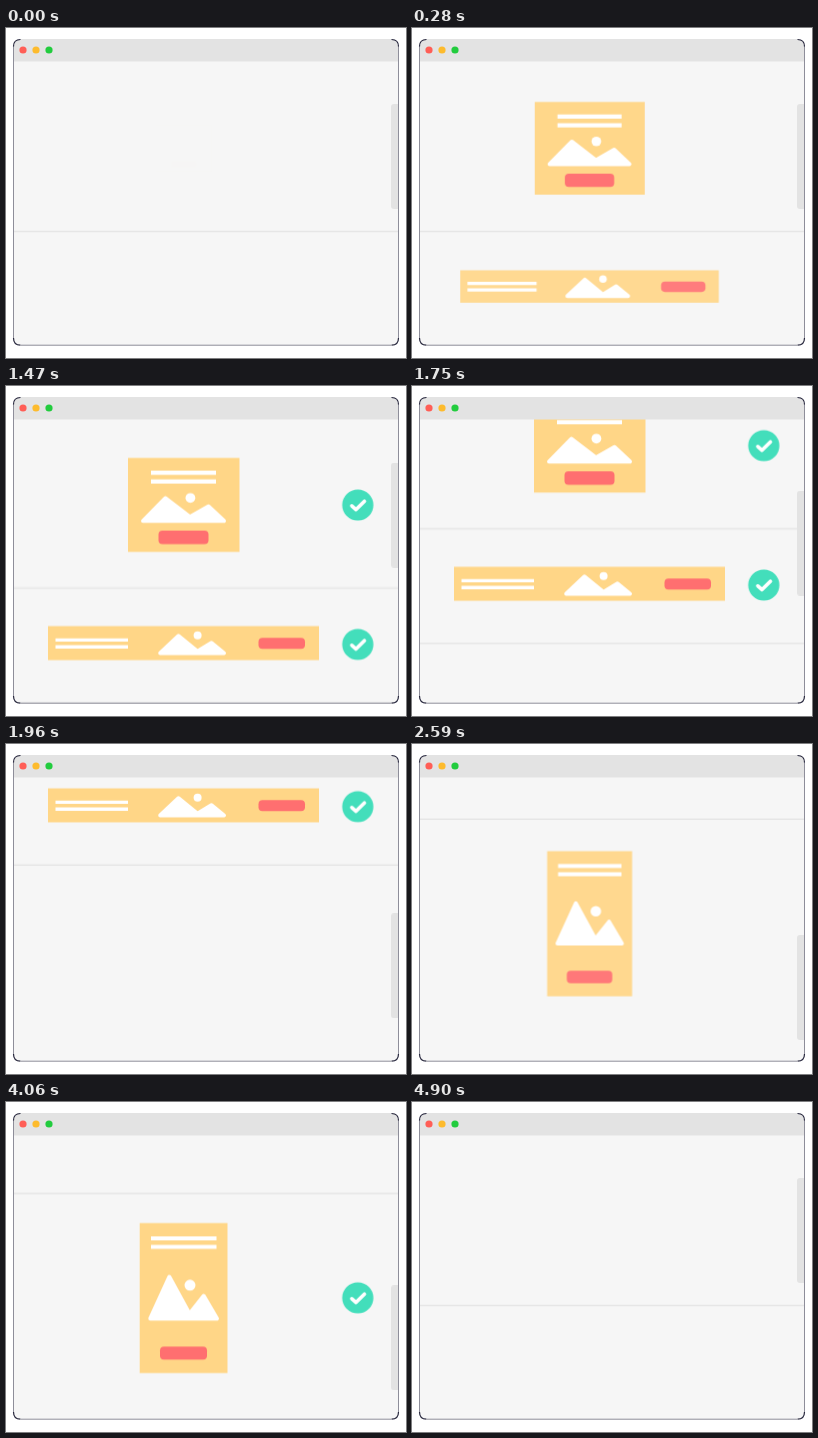
An HTML page that plays this animation: 400 by 330 pixels, repeating every 4.97 s.

```html
<!DOCTYPE html>
<html lang="en">
<head>
<meta charset="utf-8">
<title>Ad preview window</title>
<style>
  html, body { margin: 0; width: 100%; height: 100%; overflow: hidden; background: #fff; }
  svg { display: block; width: 400px; height: 330px; }

  .ad { fill: #ffd687; }
  .line { fill: #fff; }
  .hill { fill: #fff; stroke: #fff; stroke-width: 4; stroke-linejoin: round; }
  .button { fill: #ff6f70; }
  .rule { stroke: #e6e6e6; stroke-width: 1.4; }
  .disc { fill: #43debb; }
  .tick { fill: none; stroke: #fff; stroke-width: 3.6; stroke-linecap: round; stroke-linejoin: round; }
  .edge { fill: none; stroke: #8e8e9a; stroke-width: 1; }
  .corner { fill: none; stroke: #26263c; stroke-width: 1.2; }

  .scroll, .pop, .check { animation: 4970ms linear infinite backwards; }
  .scroll { animation-name: scroll; }
  .pop, .check { transform-box: fill-box; transform-origin: center; animation-delay: var(--at, 0ms); }
  .pop { animation-name: pop; }
  .check { animation-name: check; }

  /* down 1400-2280 ms, back up 3870-4650 ms */
  @keyframes scroll {
    0%, 28.169% { transform: translateY(0); animation-timing-function: cubic-bezier(.65, 0, .35, 1); }
    45.875%, 77.867% { transform: translateY(var(--by)); animation-timing-function: cubic-bezier(.65, 0, .35, 1); }
    93.561%, 100% { transform: translateY(0); }
  }
  @keyframes pop {
    0% { transform: scale(.5); opacity: 0; animation-timing-function: cubic-bezier(.33, 1, .68, 1); }
    8.05%, 60% { transform: scale(1); opacity: 1; }
    60.01%, 100% { transform: scale(.5); opacity: 0; }
  }
  @keyframes check {
    0% { transform: scale(0); animation-timing-function: cubic-bezier(.33, 1, .68, 1); }
    7% { transform: scale(1.13); animation-timing-function: ease-in-out; }
    14.3%, 60% { transform: scale(1); }
    60.01%, 100% { transform: scale(0); }
  }
</style>
</head>
<body>
<svg viewBox="0 0 400 330">
  <defs>
    <clipPath id="window"><rect x="7.5" y="11" width="385" height="306.5" rx="8"/></clipPath>
    <g id="mark">
      <circle class="disc" r="15.6"/>
      <path class="tick" d="M-6 .8L-1.8 4.6L6.6-3.8"/>
    </g>
  </defs>

  <g clip-path="url(#window)">
    <rect x="7" y="11" width="386" height="307" fill="#f6f6f6"/>

    <g class="scroll" style="--by:-243px">
      <path class="rule" d="M7 203.5H393M7 318.2H393"/>

      <g class="pop">
        <rect class="ad" x="122" y="73.3" width="111.5" height="94"/>
        <path class="line" d="M145 86h65v4.2h-65zM145 94.8h65v4.2h-65z"/>
        <path class="hill" d="M137 136.3L159.5 113.5L184 132.3L202.5 121.7L218 136.3z"/>
        <circle class="line" cx="184.4" cy="113.3" r="4.9"/>
        <rect class="button" x="152.5" y="146" width="50" height="13.4" rx="4"/>
      </g>

      <g class="pop" style="--at:60ms">
        <rect class="ad" x="42" y="241.5" width="271" height="34"/>
        <path class="line" d="M49.5 253.7h72.5v3.4h-72.5zM49.5 260.5h72.5v3.4h-72.5z"/>
        <path class="hill" d="M154.2 268.5L172.5 251.3L191.5 266.8L205.5 258.3L218 268.5z"/>
        <circle class="line" cx="191.6" cy="250.7" r="4"/>
        <rect class="button" x="252.5" y="253.2" width="46.5" height="11" rx="4"/>
      </g>

      <g class="pop" style="--at:2350ms">
        <rect class="ad" x="133.7" y="347.7" width="87.8" height="150"/>
        <path class="line" d="M145 361h65.5v4h-65.5zM145 369.5h65.5v4h-65.5z"/>
        <path class="hill" d="M144.3 443.2L163.3 401.5L183.5 438.5L197.7 420.5L211 443.2z"/>
        <circle class="line" cx="184" cy="409.8" r="5.5"/>
        <rect class="button" x="154" y="471.2" width="47" height="13" rx="4"/>
      </g>

      <g transform="translate(351.8 120.4)"><use class="check" style="--at:540ms" href="#mark"/></g>
      <g transform="translate(351.8 259.8)"><use class="check" style="--at:540ms" href="#mark"/></g>
      <g transform="translate(351.8 422.5)"><use class="check" style="--at:2890ms" href="#mark"/></g>
    </g>

    <rect class="scroll" style="--by:115px" x="385" y="76" width="12" height="105" rx="3" fill="#e3e3e3"/>
    <rect x="7" y="11" width="386" height="22.5" fill="#e3e3e3"/>
  </g>

  <circle cx="17" cy="22" r="3.6" fill="#ff5e56"/>
  <circle cx="30" cy="22" r="3.6" fill="#fdbb2d"/>
  <circle cx="43" cy="22" r="3.6" fill="#22cc3e"/>

  <path class="edge" d="M7.5 18V310M15 317.2H385M392.5 18V310"/>
  <path class="corner" d="M7.5 18.5Q7.5 11.5 14.5 11.5M385.5 11.5Q392.5 11.5 392.5 18.5M392.5 310Q392.5 317.2 385.5 317.2M14.5 317.2Q7.5 317.2 7.5 310"/>
</svg>
</body>
</html>
```
